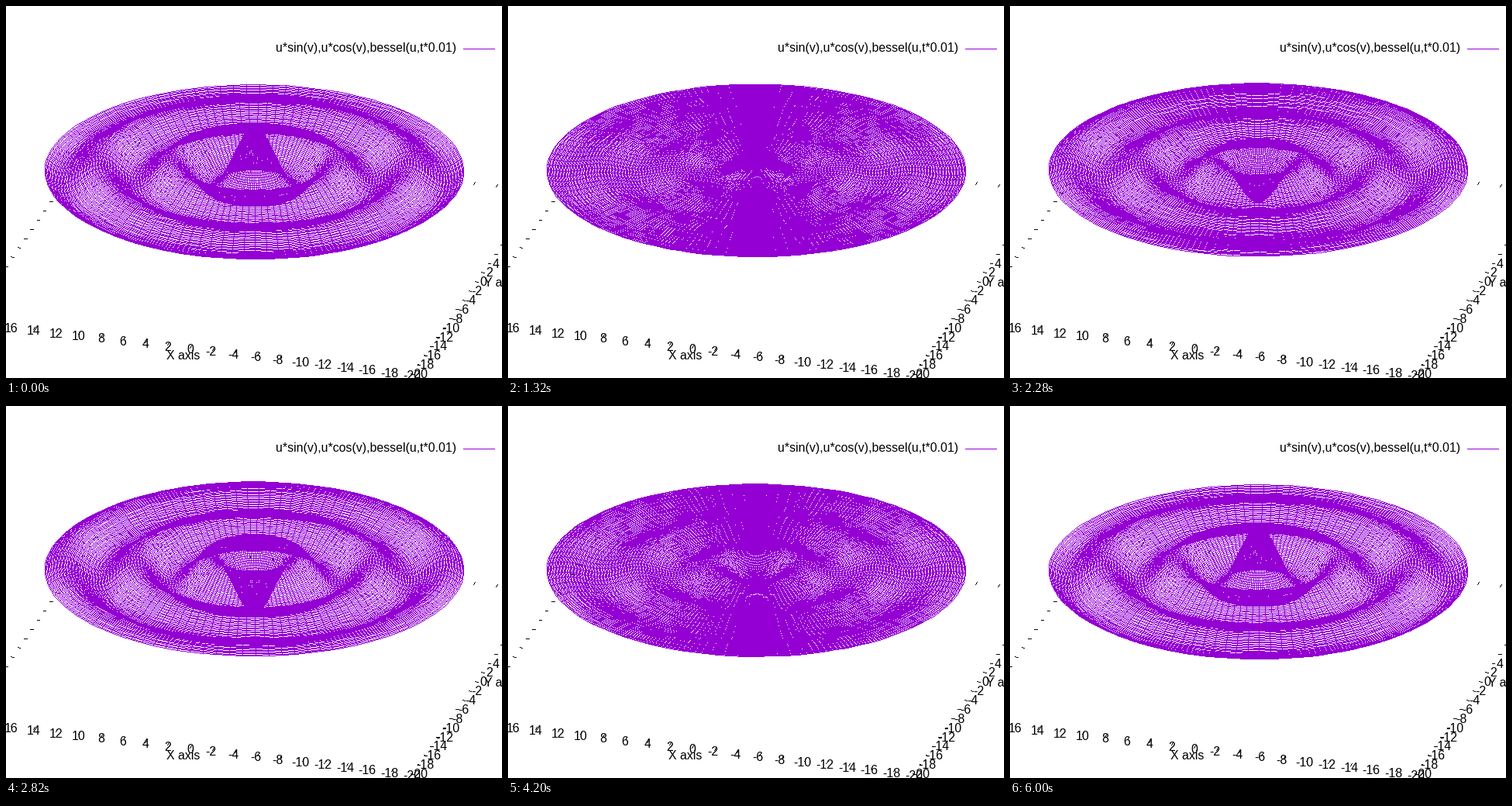
Write a matplotlib script that moves like this. It is 640 by 480 pixels and loops after 6.06 s.

```python
import numpy as np
import matplotlib.pyplot as plt
from matplotlib.animation import FuncAnimation

W, H, DPI = 640, 480, 100
FRAMES, STEP = 101, 60
VIOLET, BLACK = (148, 0, 211), (0, 0, 0)
FONT = "Liberation Sans"

CENTER = (320.5, 212.2)
TILT = np.radians(16)
SX, SY, SZ = 15.02, 6.18, 55
FLOOR = -2
RADIUS, RINGS, SPOKES, SAMPLES = 18, 200, 100, 100


def project(x, y, z):
    """Orthographic view, from model units to stage pixels."""
    c, s = np.cos(TILT), np.sin(TILT)
    px = CENTER[0] + SX * (y * s - x * c)
    py = CENTER[1] - SY * (x * s + y * c) - SZ * z
    return px, py


def bessel_j0(u):
    tau = np.arange(128) * 2 * np.pi / 128
    return np.cos(np.multiply.outer(u, np.sin(tau))).mean(axis=-1)


def mesh(u, v):
    u, v = np.broadcast_arrays(u, v)
    return u * np.sin(v), u * np.cos(v), bessel_j0(u)


def turn(n):
    return np.linspace(0, 2 * np.pi, n)


def draw_lines(canvas, px, py, color):
    """Hard-edged one-pixel polylines, one per row of px and py."""
    pts = np.floor(np.stack([px, py], axis=-1))
    start = pts[:, :-1].reshape(-1, 2)
    delta = pts[:, 1:].reshape(-1, 2) - start
    n = np.maximum(np.abs(delta).max(axis=1), 1).astype(int)
    seg = np.repeat(np.arange(len(n)), n + 1)
    k = np.arange(len(seg)) - np.repeat(np.cumsum(n + 1) - n - 1, n + 1)
    dots = start[seg] + delta[seg] * (k / n[seg])[:, None]
    x, y = np.floor(dots + 0.5).astype(int).T
    inside = (x >= 0) & (x < W) & (y >= 0) & (y < H)
    canvas[y[inside], x[inside]] = color


rings = mesh(np.linspace(0, RADIUS, RINGS)[:, None], turn(SAMPLES)[None, :])
spokes = mesh(np.linspace(0, RADIUS, SAMPLES)[None, :], turn(SPOKES)[:, None])

fig = plt.figure(figsize=(W / DPI, H / DPI), dpi=DPI, facecolor="white")
ax = fig.add_axes([0, 0, 1, 1])
backdrop = np.full((H, W, 3), 255, dtype=np.uint8)
picture = ax.imshow(backdrop, extent=(0, W, H, 0), aspect="auto",
                    interpolation="nearest")
ax.axis("off")


def label(x, y, text, ha="center"):
    if -20 < x < W + 20:
        ax.text(x, y, text, ha=ha, va="baseline", family=FONT,
                size=15.9 * 72 / DPI, color="black", clip_on=True)


def tick(x, y, dx, dy):
    """Short mark on the floor, pointing inwards."""
    px, py = project(np.array([[x, x + dx]]), np.array([[y, y + dy]]), FLOOR)
    draw_lines(backdrop, px, py, BLACK)


for n in range(-20, 21, 2):
    tick(n, -20, 0, 0.5)
    tick(n, 20, 0, -0.5)
    tick(-20, n, 0.25, 0)
    tick(20, n, -0.25, 0)
    x, y = project(n, -20, FLOOR)
    label(x - (2.5 if n < 0 else 0), y + 7, str(n))
    if n <= 4:
        x, y = project(-20, n, FLOOR)
        label(x + 6.3, y + 5, str(n))

label(229, 456, "X axis")
label(617, 361.5, "Y axis", "left")
label(581.5, 59, "u*sin(v),u*cos(v),bessel(u,t*0.01)", "right")
draw_lines(backdrop, np.array([[590, 630]]), np.array([[55, 55]]), VIOLET)


def update(t):
    swing = np.cos(2 * np.pi * t * 0.01)
    canvas = backdrop.copy()
    for x, y, z in (rings, spokes):
        draw_lines(canvas, *project(x, y, z * swing), VIOLET)
    picture.set_data(canvas)
    return [picture]


anim = FuncAnimation(fig, update, frames=FRAMES, interval=STEP,
                     init_func=lambda: update(0), repeat=True, repeat_delay=0)
plt.show()
```
